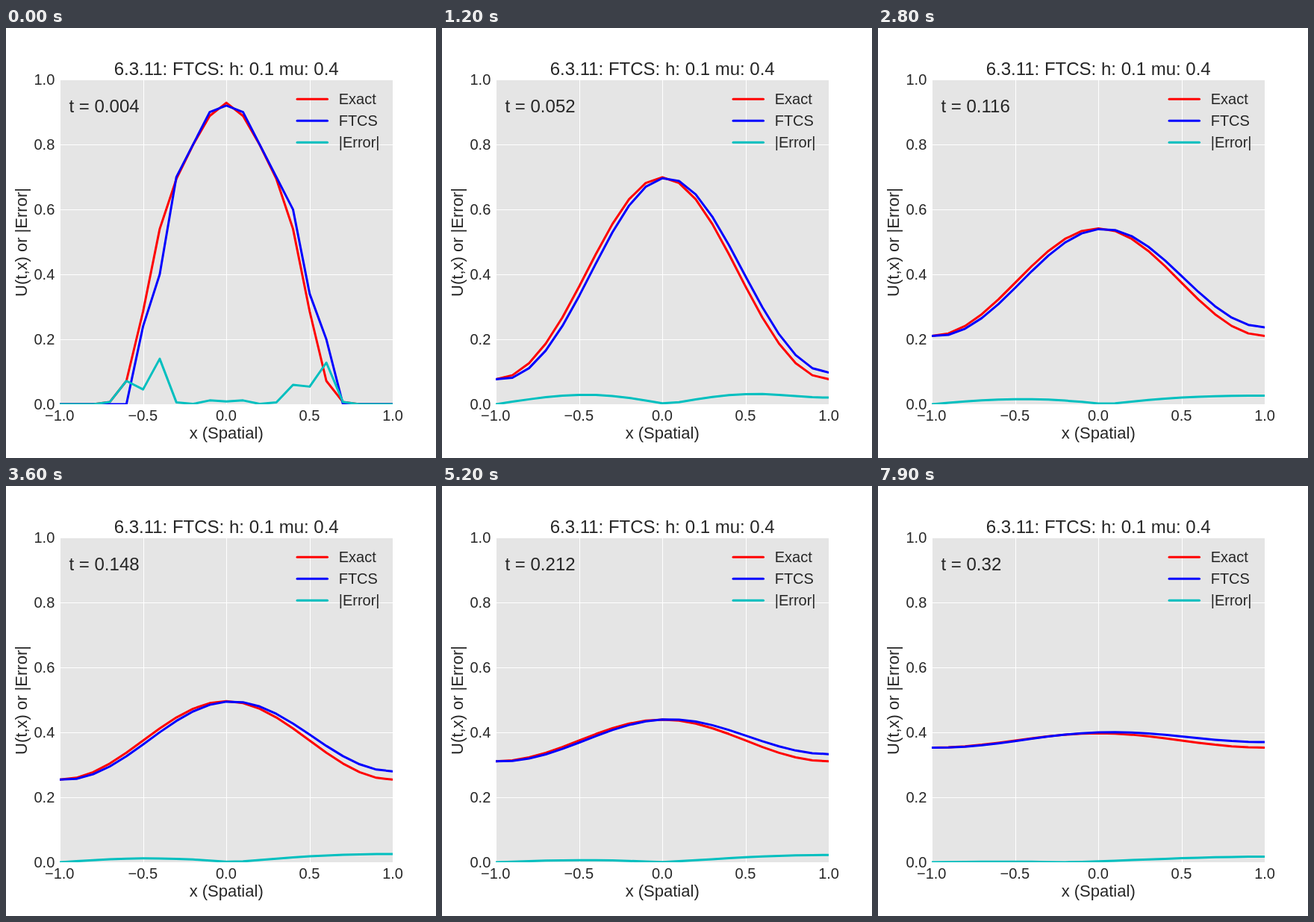
Recreate the animation shown at these times as an HTML page. Size 576 by 576 pixels, loop 8000 ms.

```html
<!DOCTYPE html>
<html lang="en">
<head>
<meta charset="utf-8">
<title>Heat equation, FTCS scheme</title>
<style>
  html, body { margin: 0; width: 100%; height: 100%; overflow: hidden; background: #fff; }
  svg { display: block; width: 576px; height: 576px; }
  text { font: 20px "Liberation Sans", Arial, sans-serif; fill: #262626; }
  .label { font-size: 22px; }
  .big { font-size: 24px; }
  .mid { text-anchor: middle; }
  .end { text-anchor: end; }
  .curve { fill: none; stroke-width: 3; stroke-linecap: round; stroke-linejoin: round; }
</style>
</head>
<body>
<svg viewBox="0 0 576 576">
  <clipPath id="area"><rect x="72" y="69" width="446" height="435"/></clipPath>
  <g id="plot" clip-path="url(#area)">
    <rect x="72" y="69" width="446" height="435" fill="#e5e5e5"/>
  </g>
  <g id="notes">
    <text class="big mid" x="295.2" y="63">6.3.11: FTCS: h: 0.1 mu: 0.4</text>
    <text class="label mid" x="295.2" y="550">x (Spatial)</text>
    <text class="label mid" transform="translate(28 287) rotate(-90)">U(t,x) or |Error|</text>
    <text class="big" id="clock" x="84.5" y="112.8"></text>
  </g>
</svg>
<script>
const STEP = 100, COUNT = 80, DT = 0.004, MU = 0.4, LAST = 20;
const plot = document.getElementById('plot');
const notes = document.getElementById('notes');
const clock = document.getElementById('clock');
const px = x => 295.2 + 223.2 * x;
const py = y => 504 - 434.88 * y;
const snap = v => Math.round(v) + 0.5;
const grid = Array.from({ length: LAST + 1 }, (_, j) => (j - 10) / 10);

function add(parent, tag, attrs, text = '') {
  const el = document.createElementNS('http://www.w3.org/2000/svg', tag);
  for (const key in attrs) el.setAttribute(key, attrs[key]);
  el.textContent = text;
  return parent.appendChild(el);
}

// Fourier series of the hat 1 - |x| cut off at |x| = 1/2
function exact(x, t) {
  let sum = 3 / 8;
  for (let l = 0; l < 30; l++) {
    const w = Math.PI * (2 * l + 1);
    sum += ((-1) ** l / w + 2 / w ** 2) * Math.cos(w * x) * Math.exp(-w * w * t)
         + Math.cos(2 * w * x) / w ** 2 * Math.exp(-4 * w * w * t);
  }
  return sum;
}

// Exact value on the left edge, zero slope on the right edge
function advance(v, t) {
  return v.map((c, j) => j === 0 ? exact(-1, t)
    : (1 - 2 * MU) * c + MU * (v[j - 1] + (j === LAST ? v[j - 1] : v[j + 1])));
}

const states = [];
let v = grid.map((x, j) => j > 5 && j < 16 ? 1 - Math.abs(x) : 0);
for (let n = 1; n <= COUNT; n++) {
  const t = n * DT;
  const u = grid.map(x => exact(x, t));
  v = advance(v, t);
  states.push([u, v, u.map((e, j) => Math.abs(e - v[j]))]);
}

for (let i = -2; i <= 2; i++) {
  const x = px(i / 2);
  add(plot, 'path', { d: `M${snap(x)} 69V504`, stroke: '#fff' });
  add(notes, 'text', { class: 'mid', x: x - 0.3, y: 526 },
    (i / 2).toFixed(1).replace('-', '\u2212'));
}
for (let i = 0; i <= 5; i++) {
  const y = py(i / 5);
  add(plot, 'path', { d: `M72 ${snap(y)}H518`, stroke: '#fff' });
  add(notes, 'text', { class: 'end', x: 65.3, y: y + 7.3 }, (i / 5).toFixed(1));
}

const series = [['Exact', '#f00'], ['FTCS', '#00f'], ['|Error|', '#00bfbf']];
const curves = series.map(([name, stroke], i) => {
  const y = 95.3 + 29 * i;
  add(notes, 'path', { class: 'curve', stroke, d: `M390 ${y}H430.5` });
  add(notes, 'text', { x: 445.7, y: y + 6.8 }, name);
  return add(plot, 'path', { class: 'curve', stroke });
});

let shown = -1;
function draw(now) {
  const n = Math.floor(now / STEP) % COUNT;
  if (n !== shown) {
    shown = n;
    curves.forEach((curve, i) => curve.setAttribute('d',
      'M' + states[n][i].map((y, j) => `${px(grid[j]).toFixed(2)} ${py(y).toFixed(2)}`).join('L')));
    clock.textContent = 't = ' + +((n + 1) * DT).toFixed(3);
  }
  requestAnimationFrame(() => draw(performance.now() - start));
}
const start = performance.now();
draw(0);
</script>
</body>
</html>
```
